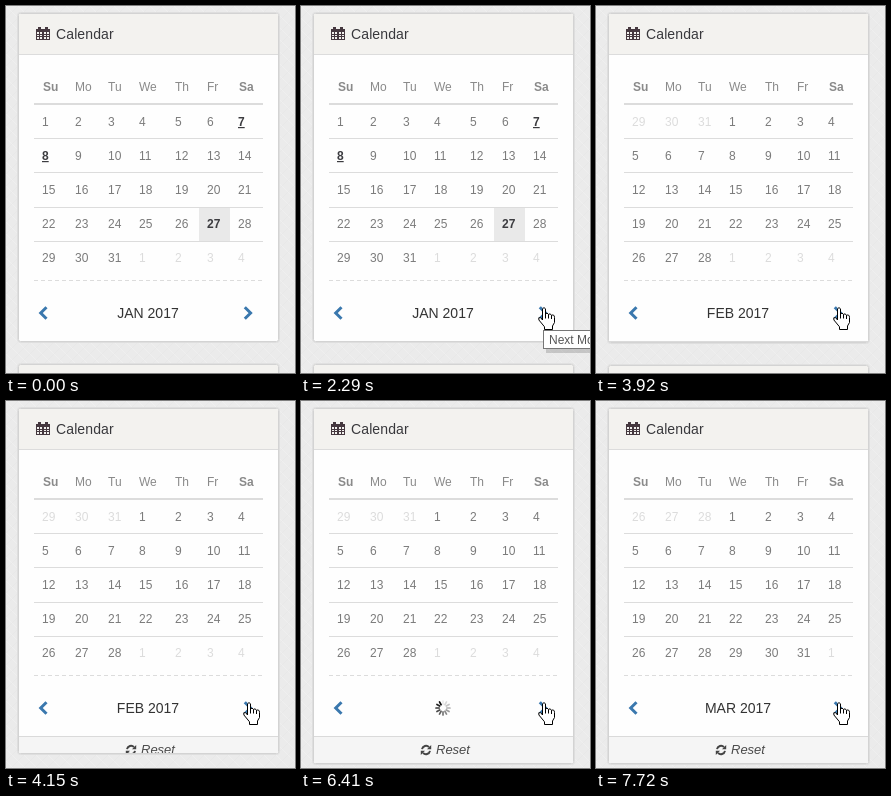
An HTML page for the animation above (8 s loop, 289 by 367 pixels).

```html
<!DOCTYPE html>
<html lang="en">
<head>
<meta charset="utf-8">
<title>Calendar</title>
<style>
html, body { margin: 0; width: 100%; height: 100%; overflow: hidden; background: #ebebeb; }
svg { display: block; }
text { font: 12px "Liberation Sans", Arial, sans-serif; fill: #7b7b7b; }
.title { font-size: 14px; fill: #38383c; letter-spacing: .12px; }
.head { fill: #8a8a8a; }
.bold { font-weight: bold; }
.faded { fill: #dcdcdc; }
.event, .today { font-weight: bold; fill: #3c3c40; }
.event { text-decoration: underline; }
.reset { font-size: 13px; font-style: italic; fill: #4a4a4a; }
.month { font-size: 14px; fill: #333; text-anchor: middle; }
.chevron { fill: none; stroke: #3a78ae; stroke-width: 3; }
.tip { fill: #575757; }
.crisp { shape-rendering: crispEdges; }
</style>
</head>
<body>
<svg id="stage" width="289" height="367" viewBox="0 0 289 367">
  <defs>
    <pattern id="weave" width="24" height="24" patternUnits="userSpaceOnUse">
      <path d="M0 0L24 24M0 12L12 24M12 0L24 12" stroke="#efefef" fill="none"/>
      <path d="M24 0L0 24M12 0L0 12M24 12L12 24" stroke="#e8e8e8" fill="none"/>
    </pattern>
  </defs>
  <rect width="289" height="367" fill="#ebebeb"/>
  <rect width="289" height="367" fill="url(#weave)"/>

  <g id="nextCard">
    <rect x="11.5" y="357.5" width="262" height="80" rx="3" fill="#f3f2ef" stroke="#e0e0e0"/>
    <rect x="12.5" y="358.5" width="260" height="80" rx="2" fill="#f3f2ef" stroke="#d3d3d3"/>
  </g>

  <rect id="edge" x="11.5" y="6.5" width="262" height="330" rx="3" fill="none" stroke="#dedede"/>
  <rect id="card" x="12.5" y="7.5" width="260" height="328" rx="2" fill="#fefefe" stroke="#d3d3d3"/>
  <g class="crisp">
    <rect x="13" y="8" width="259" height="40" fill="#f3f2ef"/>
    <rect x="13" y="48" width="259" height="1" fill="#dcdcdc"/>
  </g>
  <g id="icon" class="crisp" fill="#45383f">
    <path d="M30 23h14v11h-14z"/>
    <path d="M32 21h3v4h-3zM39 21h3v4h-3z"/>
  </g>
  <text class="title" x="50" y="33">Calendar</text>

  <g id="lines" class="crisp"></g>
  <rect id="today" class="crisp" x="193" y="202" width="31" height="33" fill="#e9e9e9"/>
  <g id="heads"></g>
  <g id="days"></g>
  <path class="crisp" d="M28 274.5H257" stroke="#dcdcdc" stroke-dasharray="4 3"/>

  <path class="chevron" d="M40.5 301.2L34.7 307L40.5 312.8"/>
  <path class="chevron" d="M238.8 301.2L244.6 307L238.8 312.8"/>
  <text id="month" class="month" x="142" y="312"></text>
  <g id="spinner" transform="translate(142 307)"></g>

  <svg id="pane" x="13" y="335" width="259" height="0" overflow="hidden">
    <rect width="259" height="28" fill="#f5f5f5"/>
    <rect width="259" height="1" fill="#dadada"/>
    <g transform="translate(112 14)">
      <path d="M-4 -.8A4.1 4.1 0 0 1 3 -2.9M4 .8A4.1 4.1 0 0 1 -3 2.9" fill="none" stroke="#444" stroke-width="1.9"/>
      <path d="M5.2 -5V-.8H1zM-5.2 5V.8H-1z" fill="#444"/>
    </g>
    <text class="reset" x="122" y="18">Reset</text>
  </svg>

  <g id="tooltip">
    <rect x="245" y="327" width="60" height="20" fill="#000" opacity=".16"/>
    <rect x="242.5" y="324.5" width="70" height="18" fill="#fff" stroke="#767676"/>
    <text class="tip" x="248" y="338">Next Month</text>
  </g>
  <path id="arrow" d="M0 0V16.5L4 13L6.7 19L9.4 17.8L6.8 12H11.8Z" fill="#000" stroke="#fff"/>
  <g id="hand" stroke="#000" stroke-linejoin="round">
    <path fill="#fff" d="M4.5 13V1.8Q6 -.6 7.5 1.8V7Q9 5 10.5 7.4Q12 5.8 13.5 8.2Q16.5 7.2 16.5 10.5V15.5L14.5 19V22.5H6.5V19.8L.9 13Q-.2 9.8 2.6 10.6Z"/>
    <path fill="none" d="M7.5 7V11.5M10.5 7.4V11.5M13.5 8.2V12"/>
  </g>
</svg>
<script>
const LOOP = 8000, TICK = 77.5, PANE = 27;
const COLS = [36, 69, 102, 133, 169, 201, 232];
const NAMES = ["Su", "Mo", "Tu", "We", "Th", "Fr", "Sa"];
const MONTHS = [
  { name: "JAN 2017", lead: 0, prev: 31, len: 31, events: [7, 8], today: 27 },
  { name: "FEB 2017", lead: 3, prev: 31, len: 28, events: [] },
  { name: "MAR 2017", lead: 3, prev: 28, len: 31, events: [] }
];
// Spinner steps lag the sampling ticks; offset is the phase at the start.
const LOADS = [
  { from: 2670, to: 3920, offset: .09 },
  { from: 6410, to: 7720, offset: .5 }
];

const $ = id => document.getElementById(id);

function add(parent, tag, attrs, text = "") {
  const el = document.createElementNS("http://www.w3.org/2000/svg", tag);
  for (const key in attrs) el.setAttribute(key, attrs[key]);
  el.textContent = text;
  return $(parent).appendChild(el);
}

const show = (id, on) => $(id).setAttribute("visibility", on ? "visible" : "hidden");
const move = (id, x, y) => $(id).setAttribute("transform", `translate(${x} ${y})`);
const ticks = (t, from) => Math.floor((t - from + 4) / TICK);

NAMES.forEach((name, i) => {
  const weekend = i % 6 === 0;
  add("heads", "text", { x: COLS[i] + (weekend ? 1 : 0), y: 85, class: weekend ? "head bold" : "head" }, name);
});

add("lines", "rect", { x: 28, y: 97, width: 229, height: 2, fill: "#dcdcdc" });
for (const y of [132, 166, 201, 235])
  add("lines", "rect", { x: 28, y, width: 229, height: 1, fill: "#dcdcdc" });

for (let i = 0; i < 12; i++)
  add("icon", "rect", {
    x: 31 + i % 4 * 3 + (i % 4 > 1 ? 1 : 0), y: 26 + Math.floor(i / 4) * 3 - (i > 7 ? 1 : 0),
    width: 2, height: i > 3 && i < 8 ? 1 : 2, fill: "#f3f2ef"
  });

const spokes = Array.from({ length: 12 }, (_, i) =>
  add("spinner", "path", {
    d: "M0 -3.8V-7", "stroke-width": 1.7, "stroke-linecap": "round", stroke: "#111",
    transform: `rotate(${i * 30})`
  }));

let shown = -1;
function showMonth(index) {
  if (index === shown) return;
  shown = index;
  const m = MONTHS[index];
  $("days").replaceChildren();
  for (let i = 0; i < 35; i++) {
    let day = i - m.lead + 1, kind = "";
    if (day < 1 || day > m.len) {
      day += day < 1 ? m.prev : -m.len;
      kind = "faded";
    } else if (m.events.includes(day)) kind = "event";
    else if (day === m.today) kind = "today";
    add("days", "text", { x: COLS[i % 7], y: 120 + Math.floor(i / 7) * 34, class: kind }, day);
  }
  $("month").textContent = m.name;
  show("today", m.today);
}

function drawSpinner(t) {
  const load = LOADS.find(l => t >= l.from && t < l.to);
  show("spinner", load);
  show("month", !load);
  if (!load) return;
  const step = Math.floor(ticks(t, load.from) * .78 + load.offset);
  spokes.forEach((spoke, i) => {
    const age = (11 + step - i + 24) % 12;
    spoke.setAttribute("opacity", Math.max(.08, 1 - age * .085).toFixed(3));
  });
}

function drawPointer(t) {
  const k = Math.min(10, ticks(t, 1050));
  const x = Math.round(k < 5 ? 247 - k * .8 : 243 - (k - 5) * .2);
  const y = Math.round(k < 5 ? 361 - k * 7.8 : 322 - (k - 5) * 4.2);
  const onLink = y < 314;
  show("arrow", t >= 1050 && !onLink);
  show("hand", t >= 1050 && onLink);
  move("arrow", x + .5, y + .5);
  move("hand", x - 5, y);
  show("tooltip", t >= 2290 && t < 2440);
}

function drawPane(t) {
  let h = 0;
  if (t >= 3920) {
    const p = Math.min(1, (60 + ticks(t, 3920) * 77) / 500);
    h = Math.round(PANE * (.5 - Math.cos(Math.PI * p) / 2));
  }
  $("edge").setAttribute("height", 330 + h);
  $("card").setAttribute("height", 328 + h);
  $("pane").setAttribute("height", h);
  move("nextCard", 0, h);
}

function draw(t) {
  showMonth(t < 3920 ? 0 : t < 7720 ? 1 : 2);
  drawSpinner(t);
  drawPointer(t);
  drawPane(t);
}

const start = performance.now();
function frame() {
  draw((performance.now() - start) % LOOP);
  requestAnimationFrame(frame);
}
frame();
</script>
</body>
</html>
```
